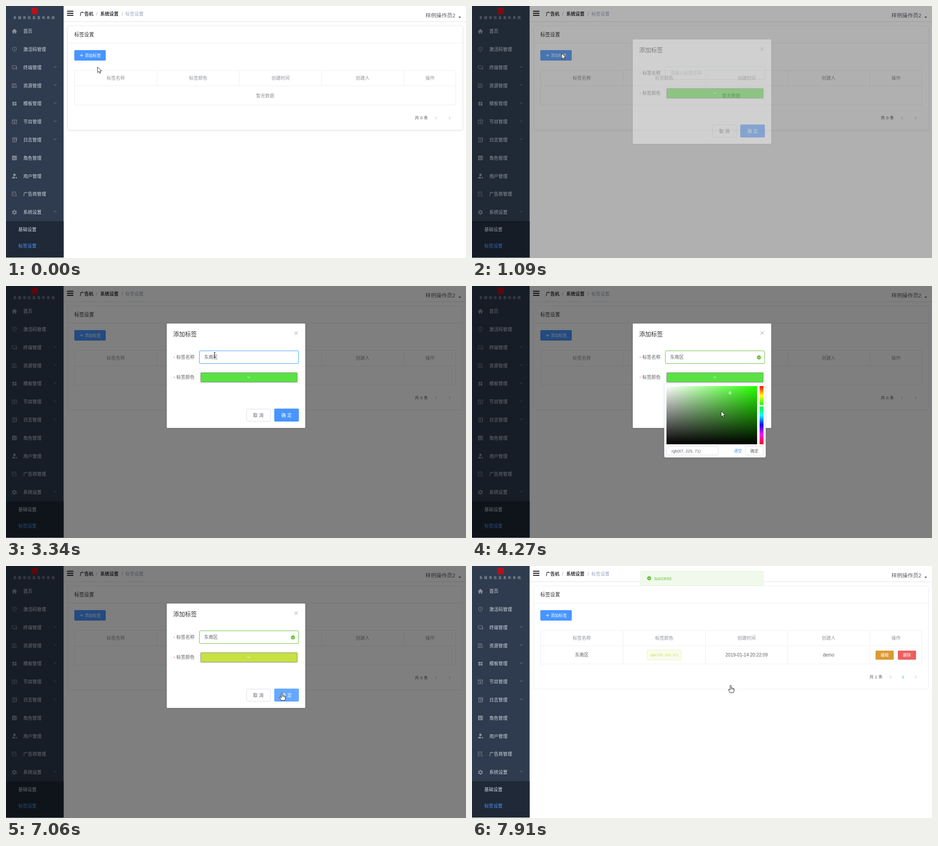
An HTML page for the animation above (7.99 s loop, 1010x554 px).

```html
<!DOCTYPE html>
<html lang="zh">
<head>
<meta charset="utf-8">
<title>标签设置</title>
<style>
html, body { margin: 0; width: 1010px; height: 554px; overflow: hidden; background: #fff; }
svg { display: block; font-family: "Liberation Sans", "Noto Sans CJK SC", "Noto Sans CJK", sans-serif; }
.shadow { filter: drop-shadow(0 1px 2px #0000001c); }
</style>
</head>
<body>
<svg id="stage" width="1010" height="554" viewBox="0 0 1010 554"></svg>
<script>
const LOOP = 7990, BLUE = '#4895ff', HOVER = '#66a8ff', GREEN = '#67c23a', LINK = '#4a94fa';
const $ = id => document.getElementById(id);

// Markup helpers; text is placed by its vertical centre.
const text = (x, cy, size, fill, str, attrs = '') =>
  `<text x="${x}" y="${cy + size * .37}" font-size="${size}" fill="${fill}" ${attrs}>${str}</text>`;
const mid = (x, cy, size, fill, str, attrs = '') =>
  text(x, cy, size, fill, str, 'text-anchor="middle" ' + attrs);
const rect = (x, y, w, h, fill, stroke = 'none', r = 0, attrs = '') =>
  `<rect x="${x}" y="${y}" width="${w}" height="${h}" fill="${fill}" stroke="${stroke}" rx="${r}" ${attrs}/>`;
const line = (d, stroke, width = 1, attrs = '') =>
  `<path d="${d}" fill="none" stroke="${stroke}" stroke-width="${width}" ${attrs}/>`;
const group = (id, body, attrs = '') => `<g id="${id}" ${attrs}>${body}</g>`;
const chevron = (x, y, dx, dy, color) =>
  line(dy ? `M${x - 3} ${y - dy / 2}l3 ${dy}l3 ${-dy}` : `M${x - dx / 2} ${y - 3}l${dx} 3l${-dx} 3`, color);

// Sidebar entries: label, icon path, filled icon, arrow direction.
const MENU = [
  ['首页', 'M0-5.5L6 .5H4V5H1V2H-1V5H-4V.5H-6Z', 1],
  ['激活码管理', 'M0-5L4-3.5V0Q4 3 0 5Q-4 3-4 0V-3.5ZM0-2V2', 0],
  ['终端管理', 'M-5-4H4V2H-5ZM-2 4H1M5.5-1V4H3', 0, 1],
  ['资源管理', 'M-5-4H-2V4H-5ZM-2-4H1V4M1-3L3-4L5 4H-5', 0, 1],
  ['模板管理', 'M-4.5-4H-.5V0H-4.5ZM.5-4H4.5V-1H.5ZM-4.5 1H-.5V4H-4.5ZM.5 0H4.5V4H.5Z', 1, 1],
  ['节目管理', 'M-5-4.5H5V4.5H-5ZM-5-2H5M-1 0L2 1.5L-1 3Z', 0, 1],
  ['日志管理', 'M-4-5H5V3M-4-5V5H4V-3H-4M-2-1H2M-2 1H2M-2 3H2', 0, 1],
  ['角色管理', 'M-5-5H3V5H-5ZM4-5H5.5V5H4ZM-1-3L.5-1L-1 .5L-2.500-1ZM-3.500 3Q-1-1 1.500 3Z', 1],
  ['用户管理', 'M0-5.5A2.5 2.5 0 0 1 0 0A2.5 2.5 0 0 1 0-5.5ZM-5.5 5Q-5 1 0 1L2 5ZM3 2H5.5V5H3Z', 1],
  ['广告商管理', 'M-5-5H3V0M-5-5V4H-1M-3-2H1M-3 1H-1M3 1A2 2 0 1 1 2.9 1', 0],
  ['系统设置', 'M0-3A3 3 0 1 1-.1-3ZM0-5.5V-3M0 5.5V3M-5-2.8L-3-1.5M5-2.8L3-1.5M-5 2.8L-3 1.5M5 2.8L3 1.5', 0, -1]
];

const sidebar = () => rect(0, 0, 126.5, 553, '#2f3b4e') + rect(0, 473, 126.5, 80, '#1f2937') +
  rect(56, 4, 14, 14, '#b5121b') +
  text(16, 25, 7, '#b4bac4', '多媒体信息发布系统', 'letter-spacing="3.5"') +
  MENU.map(([label, icon, solid, arrow], i) => {
    const y = 55.5 + 39.8 * i;
    return `<path transform="translate(18.5 ${y})" d="${icon}" ` + (solid ? 'fill="#8c929c" fill-rule="evenodd"/>' :
      `fill="none" stroke="#868c97" stroke-width="${i == 10 ? 2 : .9}"/>`) +
      text(38, y, 10, '#d0d7e0', label) + (arrow ? chevron(108, y - 1.5, 0, 3 * arrow, '#7d8796') : '');
  }).join('') +
  text(27, 491, 10, '#d0d7e0', '基础设置') + text(27, 527, 10, LINK, '标签设置');

const header = () => line('M127 34.5H1010', '#e0e2e6') +
  line('M134 11.5h14M134 16h14M134 20.5h14', '#111', 2) +
  text(162, 17, 10, '#303133', '广告机', 'font-weight="700"') + text(198, 17, 10, '#a0a4ac', '/') +
  text(207, 17, 10, '#303133', '系统设置', 'font-weight="700"') + text(254, 17, 10, '#a0a4ac', '/') +
  text(262, 17, 10, '#97a8be', '标签设置') +
  text(921, 21, 11.8, '#5a5e66', '样例操作员2') + '<path d="M993.5 23.5h5.5l-2.75 3z" fill="#444"/>';

const EDGE = '#ebeef5', GREY = '#909399', INK = '#606266';
const COLUMNS = [['标签名称', 241], ['标签颜色', 422], ['创建时间', 603], ['创建人', 783], ['操作', 931]];

const page = () =>
  rect(135.5, 43.5, 867, 229, '#fff', EDGE, 3, 'id="cardShadow" class="shadow"') +
  rect(135.5, 43.5, 867, 229, '#fff', EDGE, 3, 'id="card"') +
  line('M136 81.5H1002', EDGE) + text(150, 63, 10.8, '#303133', '标签设置') +
  rect(150, 97, 69, 23, BLUE, 'none', 2, 'id="add"') +
  line('M162.5 108.5h7M166 105v7', '#fff') + text(173, 108.5, 8.8, '#fff', '添加标签', 'font-weight="500"') +
  rect(150.5, 141.5, 837, 76, 'none', EDGE, 0, 'id="table"') + line('M150 175.5H988', EDGE) +
  line('M331.5 141v35m181-35v35m180.5-35v35m180.5-35v35', EDGE) +
  COLUMNS.map(([label, x]) => mid(x, 158, 10, GREY, label)).join('') +
  group('next', chevron(974, 0, 3, 0, '#b0b3ba')) +
  group('empty', mid(569, 197, 10, GREY, '暂无数据') + mid(912, 246, 9.3, INK, '共 0 条') +
    chevron(944, 246, -3, 0, '#b0b3ba')) +
  group('filled', line('M331.5 176v40m181-40v40m180.5-40v40m180.5-40v40', EDGE) +
    mid(241, 195, 10, INK, '东南区') +
    rect(384.5, 184.5, 75, 22, 'rgba(199,225,67,.1)', 'rgba(199,225,67,.3)', 2) +
    mid(422, 195.5, 8.1, 'rgb(199,225,67)', 'rgb(199, 225, 67)') +
    mid(603, 195, 10, INK, '2019-01-14 20:22:09') + mid(783, 195, 10, INK, 'demo') +
    rect(886, 186, 40, 20, '#dc9a33', 'none', 2) + mid(906, 196, 8.8, '#fff', '编辑', 'font-weight="500"') +
    rect(935, 186, 40, 20, '#ec6060', 'none', 2) + mid(955, 196, 8.8, '#fff', '删除', 'font-weight="500"') +
    mid(887, 244, 9.3, INK, '共 1 条') + chevron(919, 244, -3, 0, '#b0b3ba') + mid(946.5, 244, 9, LINK, '1'));

const tick = (x, y) => `<circle cx="${x}" cy="${y}" r="4.5" fill="${GREEN}"/>` +
  line(`M${x - 2} ${y}l1.5 1.5l2.8-2.8`, '#fff');

const dialog = () => rect(353, 82.5, 304, 229.5, '#fff', 'none', 1.5, 'class="shadow"') +
  text(367, 105, 13, '#303133', '添加标签') + line('M633.5 100l7 7m0-7l-7 7', GREY) +
  ['标签名称', '标签颜色'].map((label, i) =>
    text(367.5, 158 + 44 * i, 9, '#f08080', '*') + text(374, 156.5 + 44 * i, 10, INK, label)).join('') +
  rect(424.5, 142.5, 218, 28, '#fff', '#dcdfe6', 2.5, 'id="field"') +
  text(435, 156.5, 10, '#c0c4cc', '请输入标签名称', 'id="hint"') +
  line('M435.5 151v12', '#333', 1, 'id="caret"') +
  text(435, 156.5, 10, INK, '东南区', 'id="typed"') + group('valid', tick(630, 157)) +
  rect(424.5, 187.5, 218, 26, '#fff', '#e6e8ec', 2.5) +
  rect(427.5, 190.5, 212, 21, '#000', '#888', 1, 'id="swatch"') + chevron(533, 200.5, 0, 3, '#fff') +
  rect(528.5, 270.5, 52, 27, '#fff', '#dcdfe6', 2.5) + mid(554, 284, 10, INK, '取 消') +
  rect(589, 269.5, 54, 28.5, BLUE, 'none', 2.5, 'id="ok"') +
  mid(616, 284, 10, '#fff', '确 定', 'font-weight="500"');

const picker = () => rect(422.5, 215.5, 222, 161, '#fff', EDGE, 2.5, 'class="shadow"') +
  rect(427, 220, 199, 128, '#0f0', 'none', 0, 'id="base"') +
  rect(427, 220, 199, 128, 'url(#white)') + rect(427, 220, 199, 128, 'url(#black)') +
  '<circle cx="566.5" cy="235" r="2" fill="#0004" stroke="#fff" stroke-width="1.3"/>' +
  rect(631.5, 220, 8.5, 128, 'url(#hues)') + rect(631, 0, 9.5, 3, '#fff', '#ddd', 1, 'id="thumb" stroke-width=".5"') +
  rect(427.5, 352.5, 113, 19, '#fff', '#dcdfe6', 2) + text(438, 362.5, 9, INK, '', 'id="code"') +
  mid(584, 362.5, 9, LINK, '清空') +
  rect(600.5, 352.5, 39, 19, '#fff', '#dcdfe6', 2, 'id="pick"') + mid(620, 362.5, 9, INK, '确定', 'id="pickText"');

const stop = (offset, color, alpha = 1) =>
  `<stop offset="${offset}" stop-color="${color}" stop-opacity="${alpha}"/>`;
const defs = '<defs><linearGradient id="white">' + stop(0, '#fff') + stop(1, '#fff', 0) + '</linearGradient>' +
  '<linearGradient id="black" x2="0" y2="1">' + stop(0, '#000', 0) + stop(1, '#000') + '</linearGradient>' +
  '<linearGradient id="hues" x2="0" y2="1">' +
  [0, 1, 2, 3, 4, 5, 6].map(i => stop(i / 6, `hsl(${i * 60},100%,52%)`)).join('') + '</linearGradient></defs>';

const POINTERS = {
  arrow: '<path d="M0 0V12.5L3 9.7L5 14L7 13.2L5 9H8.8Z" fill="#fff" stroke="#111" stroke-width=".9"/>',
  hand: '<path d="M-1.3 1Q0-.8 1.3 1V6Q3 5 3.8 6.5Q5.5 5.8 6 7.3Q7.5 7 7.5 8.5V12L6 16.5H-1.5L-5 10.5Q-5.5 8.5-3.5 9L-1.3 11ZM1.3 6V9M3.8 7V9.5M6 8V10" fill="#fff" stroke="#111" stroke-width=".9"/>',
  beam: line('M-2-5.5H2M0-5.5V5.5M-2 5.5H2', '#111')
};

$('stage').innerHTML = defs + page() + sidebar() + header() +
  rect(0, 0, 1010, 554, '#000', 'none', 0, 'id="shade"') + group('dialog', dialog()) + group('picker', picker()) +
  group('toast', rect(370.5, .5, 269, 32, '#f0f9eb', '#e1f3d8', 2.5) + tick(389, 16) +
    text(400, 16, 10.5, GREEN, 'success')) +
  group('pointer', Object.entries(POINTERS).map(([id, shape]) => group(id, shape)).join(''));

// Bursts of activity: first change, last change, number of changes, pointer way-points.
const BURSTS = [
  [380, 680, 5, [197, 104]],
  [850, 1630, 11, [197, 104], [320, 130], [446, 151]],
  [1700, 1780, 2, [458, 152]],
  [2420, 2570, 3],
  [2960, 3730, 11, [458, 152], [556, 203]],
  [3810, 4580, 11, [556, 203], [542, 276.5], [594, 262]],
  [4650, 4810, 3, [632, 257]],
  [4960, 5420, 7, [637, 240]],
  [5590, 6050, 7, [621, 363]],
  [6200, 6660, 7, [621, 363], [628, 250]],
  [6820, 7060, 4, [572, 268], [606, 279]],
  [7290, 7450, 3],
  [7610, 7910, 5, [568, 262]]
];
const SHAPES = [[0, 'arrow'], [530, 'hand'], [930, 'arrow'], [1630, 'beam'], [3500, 'hand'], [3960, 'arrow'],
  [4720, 'hand'], [5730, 'arrow'], [5960, 'hand'], [6430, 'arrow'], [6970, 'hand']];

// Returns the time of the latest change and the pointer position then.
function locate(t) {
  let now = 0, pos = [201, 134];
  for (const [start, end, count, ...stops] of BURSTS) {
    if (t < start) break;
    const gap = (end - start) / (count - 1);
    const done = Math.min(count, Math.floor((t - start) / gap + .05) + 1);
    now = start + (done - 1) * gap;
    if (!stops.length) continue;
    const p = done / count, path = [pos, ...stops], far = p * p * (3 - 2 * p) * stops.length;
    const i = Math.min(Math.floor(far), stops.length - 1);
    pos = path[i].map((v, k) => v + (path[i + 1][k] - v) * (far - i));
  }
  return { now, pos };
}

function rgbOf(hue) {
  const parts = [5, 3, 1].map(n => {
    const k = (n + hue / 60) % 6;
    return Math.round(225 - 158 * Math.max(0, Math.min(k, 4 - k, 1)));
  });
  return `rgb(${parts.join(', ')})`;
}

const set = (id, attrs) => { for (const key in attrs) $(id).setAttribute(key, attrs[key]); };
const show = (id, on) => set(id, { opacity: +on });

function draw(t) {
  const { now, pos } = locate(t);
  const ramp = (a, b) => Math.max(0, Math.min(1, (now - a) / (b - a)));
  const within = (a, b) => now >= a && now < b;
  const opened = ramp(960, 1260), closed = ramp(7560, 7860), saved = now > 7670;

  set('add', { fill: within(530, 2420) ? HOVER : BLUE });
  show('cardShadow', 1 - opened);
  for (const id of ['card', 'cardShadow']) set(id, { height: saved ? 227 : 229 });
  set('table', { height: saved ? 74 : 76 });
  set('next', { transform: `translate(0 ${saved ? 244 : 246})` });
  show('empty', !saved);
  show('filled', saved);

  show('shade', .5 * ramp(960, 1160) * (1 - closed));
  set('dialog', { opacity: opened * (1 - closed), transform: `translate(0 ${-15.3 * (1 - opened + closed)})` });
  const typed = now > 3100, valid = now > 3640;
  set('field', { stroke: valid ? GREEN : now >= 2420 ? '#409eff' : now >= 1700 ? '#b4b8c2' : '#dcdfe6' });
  show('hint', !typed);
  show('typed', typed);
  show('valid', valid);
  show('caret', within(2420, 3100));
  set('ok', { fill: within(7290, 7400) ? '#3a8ee6' : now > 6960 ? HOVER : BLUE });

  // Greens are displayed slightly warmer than their written value.
  const hue = 121.5 - 51.5 * ramp(4890, 5420), tint = 70 + (hue - 70) * .8;
  set('swatch', { fill: rgbOf(tint) });
  set('base', { fill: `hsl(${tint},100%,50%)` });
  set('thumb', { y: 218.5 + hue / 360 * 128 });
  $('code').textContent = rgbOf(hue);
  const unfold = ramp(3740, 3960) * (1 - ramp(6230, 6530));
  set('picker', { opacity: unfold, transform: `translate(0 215) scale(1 ${unfold}) translate(0 -215)` });
  set('pick', { stroke: now > 5960 ? '#409eff' : '#dcdfe6' });
  set('pickText', { fill: now > 5960 ? '#409eff' : INK });

  const drop = ramp(7700, 7900);
  set('toast', { opacity: drop, transform: `translate(0 ${11 - 33 * (1 - drop)})` });

  set('pointer', { transform: `translate(${pos.map(v => v.toFixed(1))})` });
  const shape = SHAPES.filter(s => now >= s[0]).pop()[1];
  for (const id in POINTERS) show(id, id == shape);
}

const begin = performance.now();
function play() {
  draw((performance.now() - begin) % LOOP);
  requestAnimationFrame(play);
}
play();
</script>
</body>
</html>
```
